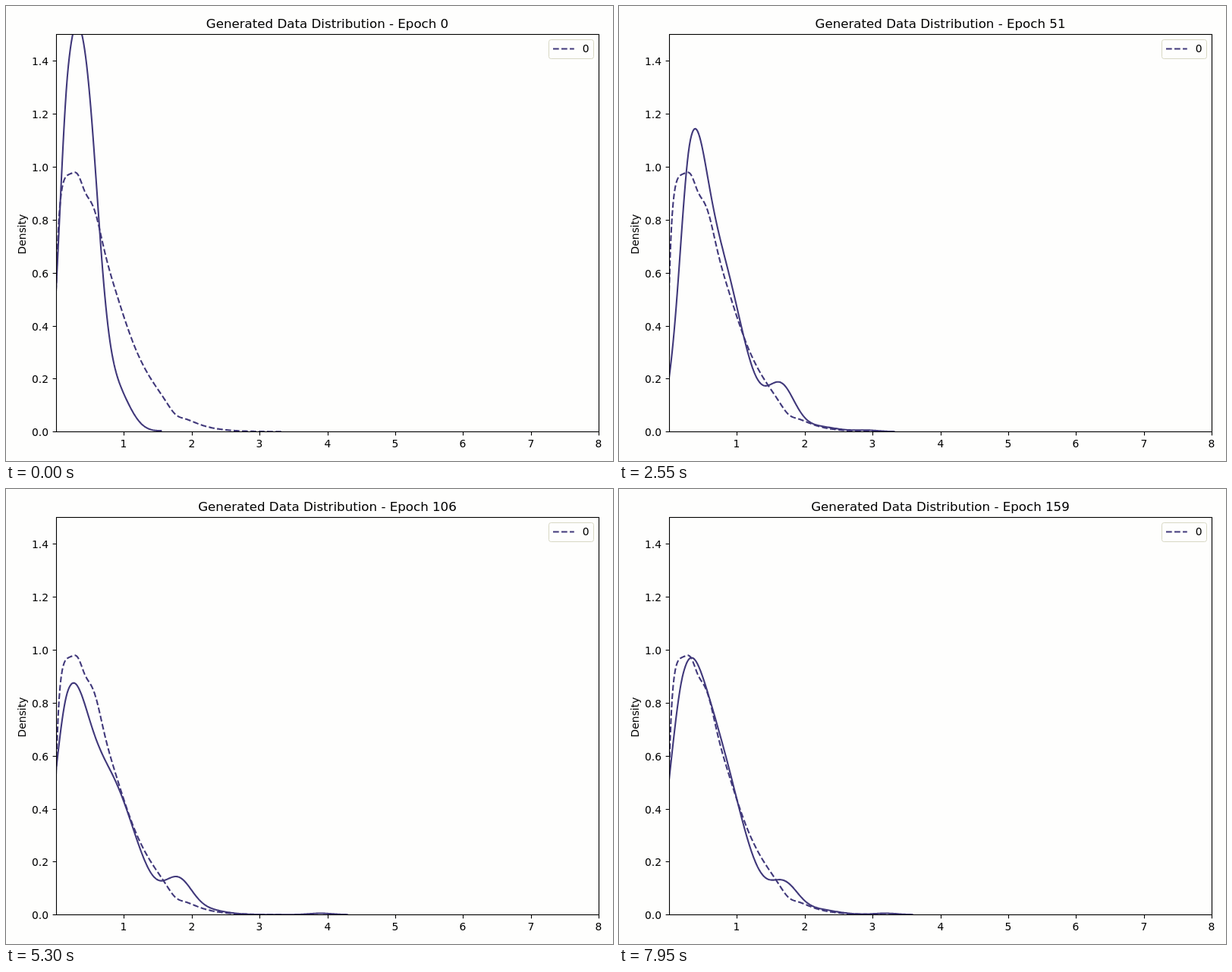
These frames come from a looping animation (800 by 600 pixels, 8 s). An HTML page:

```html
<!DOCTYPE html>
<html lang="en">
<head>
<meta charset="utf-8">
<title>Density plot</title>
<style>
  html, body { margin: 0; width: 100%; height: 100%; overflow: hidden; background: #fefefd; }
  svg { display: block; width: 800px; height: 600px; }
  text { font: 13.89px "DejaVu Sans", sans-serif; fill: #000; }
  #title { font-size: 16.67px; }
  .mid { text-anchor: middle; }
  .end { text-anchor: end; }
  .axis { fill: none; stroke: #000; stroke-width: 1.11; }
  .line { fill: none; stroke: #40387a; stroke-width: 2.08; stroke-linejoin: round; }
  .dash { stroke-dasharray: 7.7 3.33; }
</style>
</head>
<body>
<svg viewBox="0 0 800 600">
  <defs><clipPath id="plot"><rect x="66" y="37.5" width="715" height="524"/></clipPath></defs>
  <g clip-path="url(#plot)">
    <path id="real" class="line dash"/>
    <path id="fake" class="line"/>
  </g>
  <g id="ticks"></g>
  <rect class="axis" x="66.5" y="37.5" width="715" height="524"/>
  <text id="title" class="mid" x="423.5" y="29"></text>
  <text class="mid" transform="translate(25.5 301) rotate(-90)">Density</text>
  <rect x="715.5" y="44.5" width="59" height="25" rx="2.8" fill="#fefefd" stroke="#d8d8c4"/>
  <path class="line dash" d="M721 56.5H748.8"/>
  <text x="759.8" y="61">0</text>
</svg>
<script>
const $ = id => document.getElementById(id);
const LOOP = 8000, STEP = 50;
const LEFT = 66, BASE = 561.3, UNIT_X = 89.375, UNIT_Y = 349.35;

// Each state: a narrow peak and a wide body as [centre, height, width],
// a far bump as [centre, height], and where the curve ends
const STATES = [
  { epoch: 0,   end: 1.57, peak: [.18, 1.1, .18],  body: [.47, 1.02, .18], bump: [.88, .15] },
  { epoch: 27,  end: 2.62, peak: [.33, .53, .21],  body: [.64, .88, .307], bump: [1.38, .17] },
  { epoch: 51,  end: 3.34, peak: [.32, .73, .203], body: [.7, .66, .36],   bump: [1.65, .16] },
  { epoch: 85,  end: 3.86, peak: [.215, .77, .21], body: [.66, .59, .38],  bump: [1.67, .14] },
  { epoch: 106, end: 4.32, peak: [.18, .66, .26],  body: [.75, .51, .405], bump: [1.8, .115] },
  { epoch: 126, end: 3.41, peak: [.3, .285, .2],   body: [.56, .77, .44],  bump: [1.63, .12] },
  { epoch: 159, end: 3.61, peak: [.21, .47, .245], body: [.6, .68, .42],   bump: [1.7, .1] }
];

const mix = (a, b, k) => a + (b - a) * k;
const bell = (x, c, h, w) => h * Math.exp(-0.5 * ((x - c) / w) ** 2);

// Half normal with a soft start and a few ripples
const realDensity = x =>
  bell(x, 0, 1, .79) - .47 * Math.exp(-x / .048) +
  bell(x, .32, .047, .07) + bell(x, .56, .063, .1) -
  bell(x, 1.15, .02, .2) - bell(x, 1.76, .018, .1);

// The peak rises faster than it falls; a faint blip sits before the end
function fakeDensity(x, { peak: [c, h, w], body, bump, end }) {
  return bell(x, c, h, x < c ? w * .8 : w) + bell(x, ...body) +
    bell(x, ...bump, .2) + bell(x, 2.15, .02, .3) + bell(x, end - .42, .005, .17);
}

function stateAt(epoch) {
  let i = 0;
  while (i < STATES.length - 2 && epoch >= STATES[i + 1].epoch) i++;
  const a = STATES[i], b = STATES[i + 1];
  const k = (epoch - a.epoch) / (b.epoch - a.epoch);
  const blend = key => a[key].map((v, j) => mix(v, b[key][j], k));
  return { end: mix(a.end, b.end, k), peak: blend("peak"), body: blend("body"), bump: blend("bump") };
}

function curve(density, end) {
  const points = [];
  for (let x = 0; x < end; x += .015) {
    points.push(`${(LEFT + x * UNIT_X).toFixed(2)} ${(BASE - Math.max(0, density(x)) * UNIT_Y).toFixed(2)}`);
  }
  return "M" + points.join("L");
}

// Tick marks sit on whole pixels
function drawTicks() {
  let out = "";
  for (let i = 1; i <= 8; i++) {
    const x = Math.floor(66.5 + i * UNIT_X) + .5;
    out += `<path class="axis" d="M${x} 561.5v4.9"/><text class="mid" x="${x - .5}" y="582">${i}</text>`;
  }
  for (let i = 0; i <= 7; i++) {
    const y = Math.floor(561.8 - i * UNIT_Y / 5) + .5;
    out += `<path class="axis" d="M66.5 ${y}h-4.9"/><text class="end" x="56" y="${y + 5}">${(i / 5).toFixed(1)}</text>`;
  }
  $("ticks").innerHTML = out;
}

function render(ms) {
  const epoch = Math.floor((ms % LOOP) / STEP);
  const state = stateAt(epoch);
  $("title").textContent = `Generated Data Distribution - Epoch ${epoch}`;
  $("fake").setAttribute("d", curve(x => fakeDensity(x, state), state.end));
}

drawTicks();
$("real").setAttribute("d", curve(realDensity, 3.35));
render(0);

const start = performance.now();
function tick() {
  render(performance.now() - start);
  requestAnimationFrame(tick);
}
requestAnimationFrame(tick);
</script>
</body>
</html>
```
